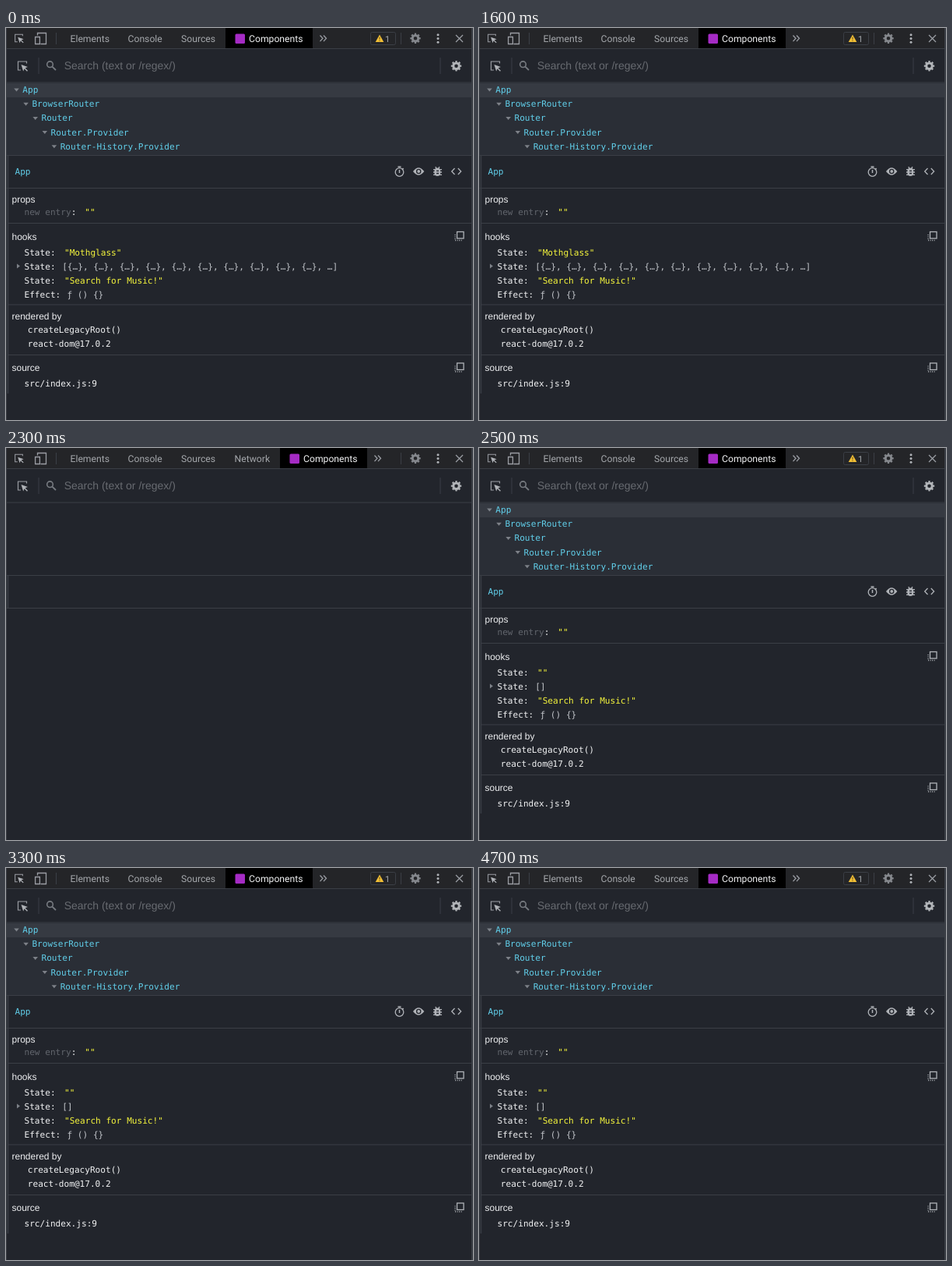
Write an HTML page that moves like this. It is 600 px wide and 503 px high and loops after 4.8 s.

```html
<!DOCTYPE html>
<html lang="en">
<head>
<meta charset="utf-8">
<title>Component inspector</title>
<style>
  html, body { margin: 0; width: 100%; height: 100%; overflow: hidden; background: #22252c; }
  svg { display: block; width: 100vw; height: 100vh; text-rendering: geometricPrecision; }
  text { white-space: pre; }
  .tab { font: 12.2px Roboto, sans-serif; fill: #a4a7ab; }
  .label { font: 12px "Liberation Sans", Arial, sans-serif; fill: #eeeff1; }
  .search { font: 14px "Liberation Sans", Arial, sans-serif; fill: #686b71; }
  .code { font: 11.1px "DejaVu Sans Mono", monospace; fill: #f2f3f4; }
  .name { fill: #61cfea; }
  .string { fill: #f5f53c; }
  .value { fill: #c3c6cb; }
  .faint { fill: #62666d; }
  .rule { stroke: #3b3f46; fill: none; }
  .icon { stroke: #9a9da3; fill: none; stroke-width: 1.3; }
  .bright { stroke: #b0b3b8; }
  .solid { fill: #b0b3b8; stroke: none; }
  .arrow { fill: #7d8188; }
</style>
</head>
<body>
<svg viewBox="0 0 600 503" preserveAspectRatio="none">
  <defs>
    <g id="gear">
      <circle r="3.8" stroke-width="3"/>
      <circle r="5.7" stroke-width="2" pathLength="16" stroke-dasharray="1 1" stroke-dashoffset=".5"/>
    </g>
    <g id="pick">
      <path d="M5.5 -3V-5.5H-5.5V5.5H-2" stroke-width="1.2"/>
      <path d="M-1.5 -1.5L7 1.4 3.6 2.8 7 6.2 6 7.2 2.6 3.8 1.2 7Z" class="solid"/>
    </g>
    <g id="copy">
      <rect x="-3" y="-5.5" width="8.5" height="8.5"/>
      <path d="M-5.5 -2V5.5H3" stroke-dasharray="1 1.5"/>
    </g>
    <path id="down" d="M-3.3 -2H3.3L0 2Z" class="arrow"/>
  </defs>

  <rect width="600" height="503" fill="#22252c"/>
  <rect width="600" height="26" fill="#242528"/>

  <!-- tab bar -->
  <g class="icon">
    <use href="#pick" transform="translate(16.5 13) scale(.88)"/>
    <path d="M40.5 9.5V6.5H51.5V20.5H44.5M37.6 11.5H43.4V20.5H37.6Z"/>
    <use href="#gear" x="526" y="13.3" stroke="#85888d"/>
    <path d="M578 9L587 18M587 9L578 18"/>
    <g class="solid"><circle cx="555" cy="8.8" r="1.5"/><circle cx="555" cy="13.5" r="1.5"/><circle cx="555" cy="18.2" r="1.5"/></g>
  </g>
  <path class="rule" d="M64.5 6V21M507.5 6V21"/>
  <g class="tab">
    <text x="82.5" y="18">Elements</text>
    <text x="156.5" y="18">Console</text>
    <text x="225" y="18">Sources</text>
    <text id="network" x="293.5" y="18">Network</text>
  </g>
  <g id="active">
    <rect x="282" width="112" height="26" fill="#000"/>
    <rect x="294.5" y="7.5" width="12.5" height="12.5" rx="1.5" fill="#a52bc4"/>
    <text class="tab" x="312" y="18" style="fill:#f1f2f3">Components</text>
    <path class="icon" d="M403.5 9.5L407 13.3 403.5 17.1M408 9.5L411.5 13.3 408 17.1"/>
  </g>
  <g id="warning">
    <rect class="rule" x="468.5" y="5.5" width="32" height="16" rx="2"/>
    <path d="M480 8.5L485.3 18H474.7Z" fill="#f3c035"/>
    <path d="M480 11.5V14.7M480 15.7V16.8" stroke="#59471d"/>
    <text class="tab" x="487" y="17.5" style="font-size:11px">1</text>
  </g>

  <!-- search bar -->
  <path class="rule" d="M1 26.5H599M1 70H599M42 38V59M558 38V59"/>
  <g class="icon">
    <use href="#pick" x="21" y="48.5"/>
    <circle cx="56.5" cy="46.7" r="3.8" stroke="#777b81" stroke-width="1.6"/>
    <path d="M59.4 49.6L64 54" stroke="#777b81" stroke-width="1.8"/>
    <use href="#gear" x="578.5" y="48.7" stroke="#b3b6ba"/>
  </g>
  <text class="search" x="74.7" y="53">Search (text or /regex/)</text>

  <g id="content">
    <rect x="1" y="71" width="597" height="92" fill="#2a2e36"/>
    <rect x="1" y="71" width="597" height="18" fill="#363a42"/>
    <g id="tree"></g>

    <text class="code name" x="11.5" y="188">App</text>
    <g class="icon bright">
      <circle cx="505.5" cy="185" r="5.3"/>
      <path d="M503.5 178H507.5M505.5 182V186M509.5 180L510.7 181.2" stroke-width="1.5"/>
      <path d="M523 184Q530 174.5 537.3 184Q530 193.5 523 184Z" class="solid"/>
      <circle cx="530.2" cy="184" r="2.6" stroke="#22252c"/>
      <rect x="550.5" y="179.5" width="7.6" height="10.5" rx="3.8" class="solid"/>
      <path d="M549 181.7H560M549 185H560M549 188.3H560M551.7 178.2L553 180M557 178.2L555.7 180"/>
      <path d="M553 183.3H556M553 186.5H556" stroke="#22252c"/>
      <path d="M576.5 180L572.7 184 576.5 188M580.8 180L584.6 184 580.8 188"/>
      <use href="#copy" x="582.5" y="267"/>
      <use href="#copy" x="582.5" y="435.5"/>
    </g>
    <path class="rule" d="M3 250.5H598M3 355H598M3 419.5H598"/>

    <g class="label">
      <text x="7.5" y="223.5">props</text>
      <text x="7.5" y="271.7">hooks</text>
      <text x="7.5" y="373.7">rendered by</text>
      <text x="7.5" y="440">source</text>
    </g>
    <path d="M14 302.5V308.5L18 305.5Z" class="arrow"/>
    <g class="code">
      <text x="23.5" y="240.4"><tspan class="faint">new entry</tspan>:</text>
      <text x="101.3" y="240.4" class="string">""</text>
      <text x="23.5" y="292">State:</text>
      <text x="75" y="292" class="string" id="query"></text>
      <text x="23.5" y="310">State:</text>
      <text x="72.2" y="310" class="value" id="results"></text>
      <text x="23.5" y="328">State:</text>
      <text x="75" y="328" class="string">"Search for Music!"</text>
      <text x="23.5" y="346">Effect:</text>
      <text x="78.5" y="346" class="value">ƒ () {}</text>
      <text x="27.8" y="391">createLegacyRoot()</text>
      <text x="27.8" y="409">react-dom@17.0.2</text>
      <text x="23.5" y="460">src/index.js:9</text>
    </g>
  </g>

  <path class="rule" d="M1 163.5H599M1 205.5H599"/>
  <path class="rule" d="M.5 0V503"/>
  <path class="rule" d="M599 0V503" stroke-width="2"/>
  <path class="rule" id="edge" stroke-width="1.5"/>
</svg>
<script>
const LOOP = 4800, RELOAD = 2300, LOADED = 2400;
const $ = id => document.getElementById(id);
const show = (id, visible) => $(id).style.display = visible ? "" : "none";

$("tree").innerHTML = ["App", "BrowserRouter", "Router", "Router.Provider", "Router-History.Provider"]
  .map((name, i) => {
    const x = 13.5 + 12.1 * i, y = 79 + 18.2 * i;
    return `<use href="#down" x="${x}" y="${y + .5}"/>
      <text class="code name" x="${x + 7.8}" y="${y + 4}">${name}</text>`;
  }).join("");

const fullList = "[" + "{…}, ".repeat(10) + "…]";

function draw() {
  const t = performance.now() % LOOP;
  const blank = t >= RELOAD && t < LOADED;
  const searched = t < RELOAD;
  show("content", !blank);
  show("warning", !blank);
  show("network", blank);
  $("active").setAttribute("transform", `translate(${blank ? 70 : 0})`);
  $("edge").setAttribute("d", `M2.5 163V${blank ? 205 : 469}`);
  $("query").textContent = searched ? '"Mothglass"' : '""';
  $("results").textContent = searched ? fullList : "[]";
  requestAnimationFrame(draw);
}
draw();
</script>
</body>
</html>
```
